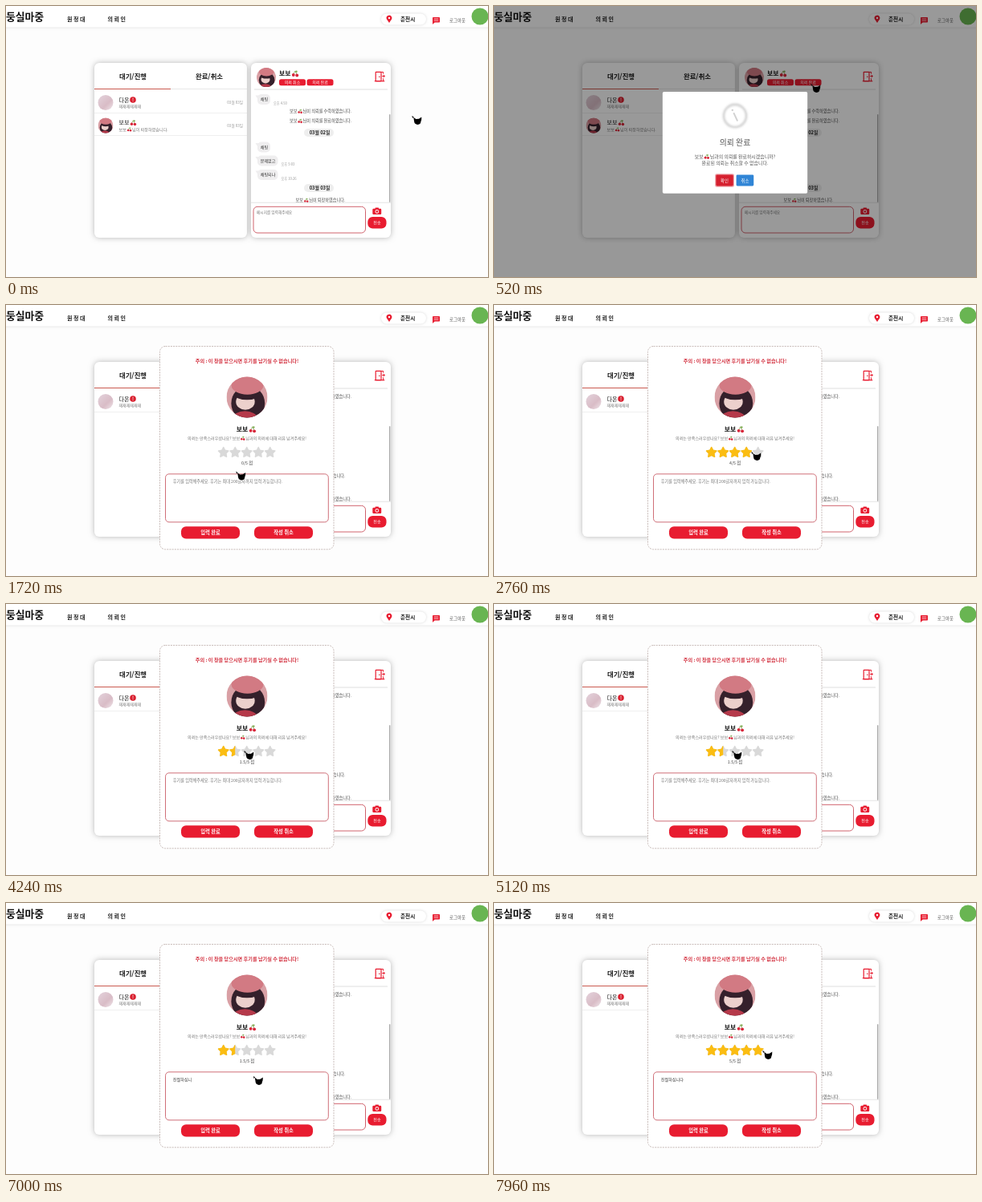
Write an HTML page with a canvas that moves like this. It is 600 px wide and 338 px high and loops after 8 s.

```html
<!DOCTYPE html>
<html lang="ko">
<head>
<meta charset="utf-8">
<title>의뢰 완료</title>
<style>
html, body { margin: 0; width: 100%; height: 100%; overflow: hidden; background: #fdfdfd; }
canvas { display: block; width: 600px; height: 338px; }
</style>
</head>
<body>
<canvas id="stage"></canvas>
<script>
const W = 600, H = 338, LOOP = 8000;
const RED = '#e81c30', INK = '#1c1c1c', GRAY = '#777';
const FONT = '"Noto Sans CJK KR", "Noto Sans CJK", "Noto Sans", sans-serif';
const USER = '보보@'; // @ stands for the cherry sign
const canvas = document.getElementById('stage');
const ctx = canvas.getContext('2d');
const dpr = window.devicePixelRatio || 1;
canvas.width = W * dpr;
canvas.height = H * dpr;

const clamp = (v, a = 0, b = 1) => Math.min(b, Math.max(a, v));
const mix = (a, b, p) => a + (b - a) * p;
const ease = p => p * p * (3 - 2 * p);

// Value of rows [time, ...numbers] at time t
function track(rows, t) {
  const i = rows.findIndex(r => r[0] > t);
  if (i < 0) return rows[rows.length - 1].slice(1);
  if (i === 0) return rows[0].slice(1);
  const a = rows[i - 1], b = rows[i];
  const p = ease((t - a[0]) / (b[0] - a[0]));
  return a.slice(1).map((v, k) => mix(v, b[k + 1], p));
}

// Last value whose start time has passed
const latest = (rows, t) => rows.reduce((v, r) => (t >= r[0] ? r[1] : v), rows[0][1]);

function box(x0, y0, x1, y1, r, fill, stroke, width = 1) {
  ctx.beginPath();
  ctx.roundRect(x0, y0, x1 - x0, y1 - y0, r);
  if (fill) { ctx.fillStyle = fill; ctx.fill(); }
  if (stroke) { ctx.strokeStyle = stroke; ctx.lineWidth = width; ctx.stroke(); }
}

function disc(x, y, r, fill) {
  ctx.beginPath();
  ctx.arc(x, y, r, 0, Math.PI * 2);
  ctx.fillStyle = fill;
  ctx.fill();
}

function line(points, color, width = 1) {
  ctx.beginPath();
  points.forEach(([x, y]) => ctx.lineTo(x, y));
  ctx.strokeStyle = color;
  ctx.lineWidth = width;
  ctx.stroke();
}

function shape(points, fill) {
  ctx.beginPath();
  points.forEach(([x, y]) => ctx.lineTo(x, y));
  ctx.closePath();
  ctx.fillStyle = fill;
  ctx.fill();
}

function shadowed(blur, alpha, draw) {
  ctx.save();
  ctx.shadowColor = `rgba(0,0,0,${alpha})`;
  ctx.shadowBlur = blur * dpr;
  draw();
  ctx.restore();
}

function cherry(x, y, s) {
  line([[x + s * .35, y + s * .1], [x + s * .65, y - s * .45], [x + s * .95, y + s * .2]], '#7d9a4a', s * .1);
  disc(x + s * .85, y - s * .35, s * .16, '#7fae54');
  disc(x + s * .38, y + s * .2, s * .25, '#d8263a');
  disc(x + s * .95, y + s * .26, s * .25, '#d8263a');
}

function label(str, x, y, size, color = INK, weight = 400, align = 'left') {
  ctx.font = `${weight} ${size}px ${FONT}`;
  ctx.textBaseline = 'middle';
  ctx.textAlign = 'left';
  const parts = str.split('@'), sign = size * 1.4;
  const width = parts.reduce((w, p) => w + ctx.measureText(p).width, sign * (parts.length - 1));
  if (align === 'center') x -= width / 2;
  if (align === 'right') x -= width;
  parts.forEach((part, i) => {
    if (i) { cherry(x + size * .06, y, size); x += sign; }
    ctx.fillStyle = color;
    ctx.fillText(part, x, y);
    x += ctx.measureText(part).width;
  });
}

const centered = (str, x, y, size, color, weight) => label(str, x, y, size, color, weight, 'center');

function button(str, x0, y0, x1, y1, r, size, weight, fill = RED) {
  box(x0, y0, x1, y1, r, fill);
  centered(str, (x0 + x1) / 2, (y0 + y1) / 2, size, '#fff', weight);
}

// Flat portrait without a face
function portrait(x, y, r) {
  ctx.save();
  ctx.translate(x, y);
  ctx.scale(r, r);
  ctx.beginPath();
  ctx.arc(0, 0, 1, 0, Math.PI * 2);
  ctx.clip();
  ctx.fillStyle = '#d9a0a5';
  ctx.fillRect(-1, -1, 2, 2);
  const blob = (bx, by, rx, ry, fill) => {
    ctx.beginPath();
    ctx.ellipse(bx, by, rx, ry, 0, 0, Math.PI * 2);
    ctx.fillStyle = fill;
    ctx.fill();
  };
  blob(.05, .3, .82, .85, '#35202b');
  blob(-.08, .22, .46, .4, '#ecd0cc');
  blob(0, -.12, .6, .25, '#35202b');
  blob(.02, -.58, .78, .45, '#d27a83');
  blob(-.1, 1.02, .6, .34, '#b5394a');
  ctx.restore();
}

function paleDisc(x, y, r) {
  const g = ctx.createLinearGradient(x - r, y - r, x + r, y + r);
  g.addColorStop(0, '#e4d3dc');
  g.addColorStop(.6, '#d9bcc6');
  g.addColorStop(1, '#efe6ea');
  disc(x, y, r, g);
}

function header() {
  shadowed(3, .1, () => { ctx.fillStyle = '#fff'; ctx.fillRect(-5, -5, W + 10, 31.5); });
  label('둥실마중', 0, 13, 12.8, '#111', 900);
  label('원 정 대', 76, 16, 7, INK, 700);
  label('의 뢰 인', 126.5, 16, 7, INK, 700);
  shadowed(3, .16, () => box(467, 9.5, 523, 23.5, 7, '#fff'));
  ctx.beginPath();
  ctx.arc(477, 15, 3.4, Math.PI * .85, Math.PI * .15);
  ctx.lineTo(477, 21);
  ctx.fillStyle = RED;
  ctx.fill();
  disc(477, 15, 1.2, '#fff');
  label('춘천시', 491, 16, 6.6, INK, 700);
  box(531, 14, 540, 20.5, .8, RED);
  shape([[531, 19.5], [534.5, 19.5], [531, 23]], RED);
  [16, 18.2].forEach(y => line([[532.7, y], [538.3, y]], '#fff', .7));
  label('로그아웃', 552, 17.5, 5.4, '#555');
  disc(590, 13, 10.5, '#69b552');
}

function listRow(y) {
  line([[110, y], [300, y]], '#ebebeb', .8);
}

function listPanel(done) {
  shadowed(7, .28, () => box(110, 71, 300, 289, 6, '#fff'));
  centered('대기/진행', 158, 88, 8.4, INK, 700);
  centered('완료/취소', 253, 88, 8.4, INK, 700);
  line([[205, 103.5], [300, 103.5]], '#e2e2e2', .8);
  line([[110, 103.5], [205, 103.5]], '#c9594f', 1.1);
  paleDisc(124, 120.5, 9.5);
  label('다온', 140.5, 117.3, 7, INK, 500);
  disc(158, 117, 3.8, '#d9202f');
  centered('!', 158, 117, 5.5, '#fff', 700);
  label('재재재재재재', 140.5, 125.3, 5, GRAY);
  label('03월 03일', 295, 120.5, 4.6, '#999', 400, 'right');
  listRow(133.5);
  if (done) return;
  portrait(124, 149, 9.5);
  label(USER, 140.5, 145.8, 7, INK, 500);
  label(USER + '님이 퇴장하였습니다.', 140.5, 154, 5.1, GRAY);
  label('03월 03일', 295, 149, 4.6, '#999', 400, 'right');
  listRow(161.5);
}

function bubble(str, y, width, time) {
  box(313, y - 6.5, 313 + width, y + 6.5, 5, '#efeeef');
  shape([[313, y - 1], [310.5, y - 5], [316, y - 5]], '#efeeef');
  label(str, 316.7, y, 5.1, '#333');
  if (time) label(time, 316 + width + 1, y + 4.5, 4.2, '#999');
}

function datePill(str, y) {
  box(371, y - 5, 408, y + 5, 5, '#eeeeee');
  centered(str, 390.5, y, 5.8, INK, 700);
}

const notice = (str, y) => centered(USER + '님이 ' + str + '하였습니다.', 391.5, y, 5.15, '#444');

function door() {
  box(460.2, 82.4, 467, 93.6, .3, null, RED, 1.2);
  line([[458.8, 93.7], [471.2, 93.7]], RED, 1.2);
  line([[467, 82.4], [469.6, 82.4], [469.6, 84.6]], RED, 1);
  line([[469.6, 90.4], [469.6, 93.7]], RED, 1);
  line([[468.2, 87.5], [471.2, 87.5]], RED, 1);
  line([[469.7, 85.8], [471.4, 87.5], [469.7, 89.2]], RED, 1);
  disc(464.8, 88.3, .8, RED);
}

function chatPanel(done) {
  shadowed(7, .28, () => box(305, 71, 479, 289, 6, '#fff'));
  if (done) {
    notice('의뢰를 완료', 114.5);
    notice('퇴장', 213);
    notice('의뢰를 완료', 242.5);
  } else {
    bubble('채팅', 116.5, 16, '오후 4:50');
    notice('의뢰를 수락', 131.5);
    notice('의뢰를 완료', 143.5);
    datePill('03월 02일', 158);
    bubble('채팅', 176, 16);
    bubble('문제없고', 193, 25.5, '오후 9:03');
    bubble('채팅되나', 210.5, 25.5, '오후 10:26');
    datePill('03월 03일', 227);
    notice('퇴장', 242.5);
  }
  portrait(324, 89, 12);
  label(USER, 340, 84.5, 7.8, INK, 700);
  button('의뢰 취소', 340, 91.2, 373, 99.2, 2.5, 5, 400);
  button('의뢰 완료', 374.5, 91.2, 407.5, 99.2, 2.5, 5, 400);
  door();
  line([[309, 104], [475, 104]], '#dedede', 1);
  box(477, done ? 151 : 135, 478.4, 245, .7, '#a9a9a9');
  line([[305, 245.2], [479, 245.2]], '#dedede', .8);
  box(308, 250.3, 447.5, 283, 5, '#fff', '#d0626d', 1);
  label('메시지를 입력해주세요', 312, 257.5, 4.7, GRAY);
  box(456.3, 252.8, 467.2, 260, 1.2, RED);
  box(459.5, 251.5, 464, 254, .6, RED);
  disc(461.8, 256.4, 2.3, '#fff');
  disc(461.8, 256.4, 1.4, RED);
  button('전송', 450.3, 263, 473.5, 277.5, 6, 5, 400);
}

// Confirm dialog
const SHOWN = 480, BORN = 320, CLOSE = 1110;

function infoIcon(t) {
  const age = (t - BORN) / 800;
  const tint = clamp((t - 560) / 300);
  const [turn, alpha] = track([[0, 45, 0], [.25, -25, .4], [.5, 15, .8], [.75, -5, 1], [1, 0, 1]], age);
  const ring = (a, b) => {
    const g = ctx.createLinearGradient(286, 0, 314, 0);
    g.addColorStop(0, a);
    g.addColorStop(1, b);
    ctx.beginPath();
    ctx.arc(300, 137, 14, 0, Math.PI * 2);
    ctx.strokeStyle = g;
    ctx.lineWidth = 1.6;
    ctx.stroke();
  };
  shadowed(3 * (1 - tint), .3 * (1 - tint), () => ring('#dedede', '#dedede'));
  ctx.save();
  ctx.globalAlpha *= tint;
  ring('#a8bde0', '#b5d6b4');
  ctx.restore();
  ctx.save();
  ctx.globalAlpha *= alpha;
  ctx.translate(300, 137);
  ctx.rotate(turn * Math.PI / 180);
  centered('i', 0, -.8, 21, tint < .5 ? '#8d8d8d' : '#4fa79a', 400);
  ctx.restore();
}

function dialog(t) {
  if (t < SHOWN || t >= CLOSE + 150) return;
  const out = clamp((t - CLOSE) / 150);
  ctx.fillStyle = `rgba(0,0,0,${.4 * (1 - out) ** 2.3})`;
  ctx.fillRect(0, 0, W, H);
  const [grow] = track([[0, .7], [.45, 1.05], [.8, .98], [1, 1]], (t - BORN) / 300);
  const scale = grow * (1 - out / 2);
  ctx.save();
  ctx.globalAlpha = 1 - out;
  ctx.translate(300, 170.3);
  ctx.scale(scale, scale);
  ctx.translate(-300, -170.3);
  box(210, 107, 390, 233.7, 1.8, '#fff');
  infoIcon(t);
  centered('의뢰 완료', 300, 170.3, 9.8, '#545454', 500);
  centered(USER + '님과의 의뢰를 완료하시겠습니까?', 300, 188, 5.9, '#545454');
  centered('완료된 의뢰는 취소할 수 없습니다.', 300, 196, 5.9, '#545454');
  if (out > 0) ctx.globalAlpha *= .45; // disabled once pressed
  else box(275.2, 209.2, 299, 225.6, 2, 'rgba(214,32,47,.4)');
  button('확인', 276.4, 210.4, 297.8, 224.4, 1.4, 5.4, 500, '#d6202f');
  button('취소', 301.6, 210.4, 323.2, 224.4, 1.4, 5.4, 500, '#3085d6');
  ctx.restore();
}

// Review window
const REVIEW = 1440;
const RATINGS = [[0, 0], [2480, 4], [3960, 1.5], [7760, 5]];
const STEPS = 'ㅊ 치 친 친ㅈ 친저 친절 친절ㅎ 친절하 친절핫 친절하시 친절하십 친절하십ㄴ 친절하십니 친절하십닏 친절하십니다'.split(' ');
const TYPE_FROM = 6280, KEY_GAP = 60;

function star(x, y, fill) {
  ctx.beginPath();
  for (let i = 0; i < 10; i++) {
    const a = i * Math.PI / 5 - Math.PI / 2, r = i % 2 ? 3.4 : 6.5;
    ctx.lineTo(x + r * Math.cos(a), y + r * Math.sin(a));
  }
  ctx.closePath();
  ctx.lineJoin = 'round';
  ctx.lineWidth = 1.5;
  ctx.fillStyle = ctx.strokeStyle = fill;
  ctx.fill();
  ctx.stroke();
}

function stars(rating) {
  for (let i = 0; i < 5; i++) {
    const x = 270.7 + i * 14.5, y = 184, part = clamp(rating - i);
    star(x, y, '#d9d9d9');
    if (!part) continue;
    ctx.save();
    ctx.beginPath();
    ctx.rect(x - 7.5, y - 9, 15 * part, 18);
    ctx.clip();
    star(x, y, '#fbbd12');
    ctx.restore();
  }
}

function review(t) {
  if (t < REVIEW) return;
  const rating = latest(RATINGS, t);
  box(191.5, 51.5, 408, 304.8, 7, '#fff');
  ctx.setLineDash([2, 1.2]);
  box(191.5, 51.5, 408, 304.8, 7, null, '#c8bbb8', 1);
  ctx.setLineDash([]);
  centered('주의 : 이 창을 닫으시면 후기를 남기실 수 없습니다!', 300, 70, 6.15, '#d3303f', 700);
  portrait(300, 115, 25.5);
  centered(USER, 299.5, 155.3, 7.8, INK, 700);
  centered('의뢰는 만족스러우셨나요? ' + USER + '님과의 의뢰에 대해 리뷰 남겨주세요!', 300, 166.3, 5.05, GRAY);
  stars(rating);
  centered(rating + '/5 점', 300, 197.3, 5.3, '#444');
  box(198.5, 210.8, 401.3, 270.8, 4.5, '#fff', '#cf6f78', 1);
  const n = Math.floor((t - TYPE_FROM) / KEY_GAP);
  if (n < 0) label('후기를 입력해주세요. 후기는 최대 200글자까지 입력 가능합니다.', 207.8, 220.3, 5.15, GRAY);
  else label(STEPS[Math.min(n, STEPS.length - 1)], 207.8, 220.3, 5.1, '#333');
  button('입력 완료', 218, 276.2, 291, 291.4, 6, 6.3, 700);
  button('작성 취소', 309, 276.2, 382, 291.4, 6, 6.3, 700);
}

const PATH = [
  [0, 505, 137], [20, 505, 137], [320, 394, 97], [560, 394, 97], [1000, 281, 218],
  [1500, 281, 218], [2080, 296, 186], [2440, 320, 183], [3120, 320, 183], [3880, 283, 184],
  [4000, 283, 184], [4240, 296, 183], [5440, 296, 183], [5920, 307.5, 216], [6300, 307.5, 216],
  [7200, 307.5, 216], [7720, 334, 184]
];

function pointer(t) {
  const [x, y] = track(PATH, t);
  ctx.save();
  ctx.translate(x + .3, y + .5);
  shape([[0, -.5], [2.4, .8], [.8, 2.4]], '#111');
  ctx.beginPath();
  ctx.moveTo(2, 1.2);
  ctx.lineTo(5, 3.4);
  ctx.lineTo(8.6, 3.2);
  ctx.lineTo(12, 1);
  ctx.quadraticCurveTo(12.2, 4.5, 11, 7);
  ctx.quadraticCurveTo(10.8, 10.2, 7.2, 10.4);
  ctx.quadraticCurveTo(3.2, 10.2, 2.8, 6.5);
  ctx.closePath();
  ctx.fillStyle = '#000';
  ctx.fill();
  ctx.restore();
}

function render(t) {
  ctx.setTransform(dpr, 0, 0, dpr, 0, 0);
  ctx.fillStyle = '#fdfdfd';
  ctx.fillRect(0, 0, W, H);
  const done = t >= REVIEW;
  header();
  listPanel(done);
  chatPanel(done);
  dialog(t);
  review(t);
  pointer(t);
}

const start = performance.now();
function tick() {
  render((performance.now() - start) % LOOP);
  requestAnimationFrame(tick);
}
tick();
</script>
</body>
</html>
```
